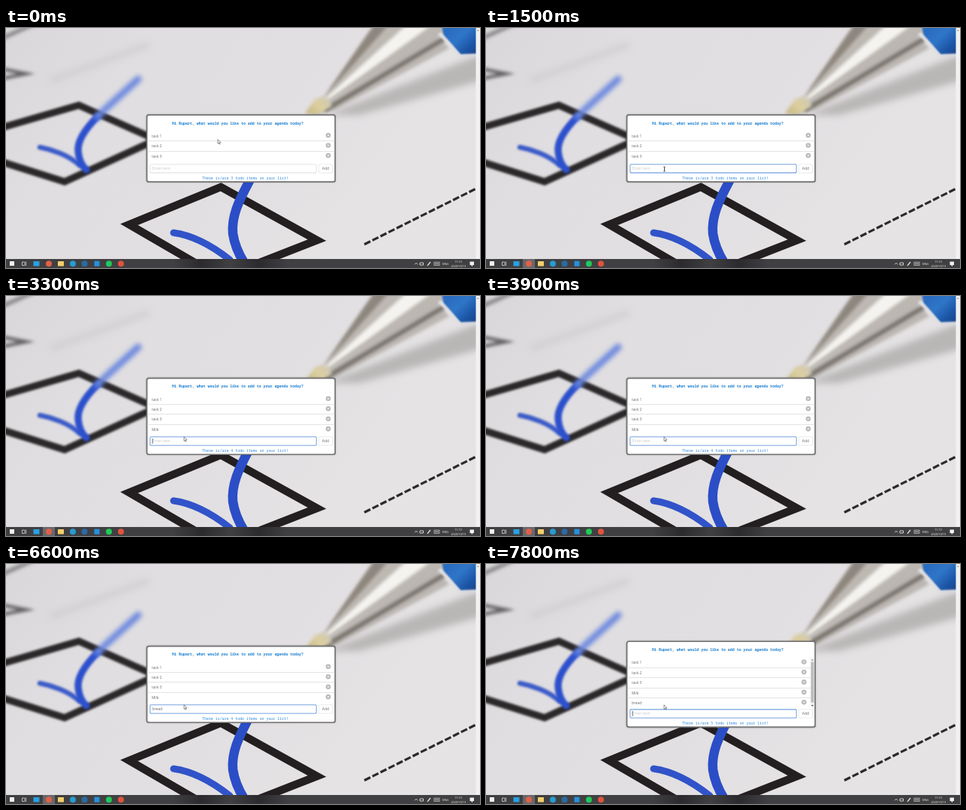
Animation of 631 by 320 pixels, one loop 8000 ms. Source, as an HTML page with a canvas:

```html
<!DOCTYPE html>
<html lang="en">
<head>
<meta charset="utf-8">
<title>Agenda list</title>
<style>
html, body { margin: 0; width: 100%; height: 100%; overflow: hidden; background: #dedcde; }
canvas { display: block; width: 631px; height: 320px; }
</style>
</head>
<body>
<canvas id="stage" width="631" height="320"></canvas>
<script>
const W = 631, H = 320, LOOP = 8000;
const SANS = '"Open Sans", "Noto Sans", sans-serif';
const MONO = '"Noto Sans Mono", "DejaVu Sans Mono", monospace';
const ctx = document.getElementById('stage').getContext('2d');
const TASKS = ['task 1', 'task 2', 'task 3', 'Milk', 'bread'];

// time, task count, typed text, start of caret blinking
const STEPS = [
  [0, 3, ''], [1000, 3, ''],
  [1700, 3, 'M'], [2100, 3, 'Mi'], [2400, 3, 'Mil'], [2600, 3, 'Milk'],
  [3300, 4, '', 3400],
  [5200, 4, 'b'], [5400, 4, 'br'], [5700, 4, 'bre'], [5900, 4, 'brea'], [6000, 4, 'bread', 6100],
  [6800, 5, '']
];

function poly(c, pts, fill) {
  c.beginPath();
  pts.forEach(([x, y]) => c.lineTo(x, y));
  c.closePath();
  c.fillStyle = fill;
  c.fill();
}

function line(c, pts, color, width, closed) {
  c.beginPath();
  pts.forEach(([x, y]) => c.lineTo(x, y));
  if (closed) c.closePath();
  c.strokeStyle = color;
  c.lineWidth = width;
  c.stroke();
}

function curve(c, path, color, width) {
  c.strokeStyle = color;
  c.lineWidth = width;
  c.stroke(new Path2D(path));
}

function box(c, x, y, w, h, fill, r = 0) {
  c.beginPath();
  c.roundRect(x, y, w, h, r);
  c.fillStyle = fill;
  c.fill();
}

function disc(c, x, y, r, fill) {
  c.beginPath();
  c.arc(x, y, r, 0, 7);
  c.fillStyle = fill;
  c.fill();
}

function text(c, s, x, y, font, color, align = 'left') {
  c.font = font;
  c.fillStyle = color;
  c.textAlign = align;
  c.textBaseline = 'alphabetic';
  c.fillText(s, x, y);
}

function ramp(c, x0, y0, x1, y1, colors) {
  const g = c.createLinearGradient(x0, y0, x1, y1);
  colors.forEach((col, i) => g.addColorStop(i / (colors.length - 1), col));
  return g;
}

function paintPaper(c) {
  c.fillStyle = ramp(c, 0, 0, 420, 320, ['#d9d7d9', '#e0dee0', '#e1dfe1', '#e5e3e4']);
  c.fillRect(0, 0, W, H);

  // distant marks
  c.filter = 'blur(4px)';
  line(c, [[60, 70], [190, 22]], '#d0ced0', 7);
  c.filter = 'blur(2.2px)';
  line(c, [[-6, 14], [36, -5]], '#8f8d8f', 6);
  line(c, [[-8, 54], [27, 61], [-8, 68]], '#656365', 4.5);

  // middle box and tick
  c.filter = 'blur(1.5px)';
  c.lineJoin = 'miter';
  line(c, [[-20, 137], [97, 103], [200, 149], [78, 205], [-20, 174]], '#2b2829', 9.5);
  c.lineCap = 'round';
  curve(c, 'M45 159 C62 162 84 170 98 183', '#3a5ac8', 6.5);
  curve(c, 'M122 118 C106 134 95 150 96 164 C97 176 100 183 107 189', '#2c50cc', 9.5);
  c.filter = 'blur(3px)';
  curve(c, 'M176 68 C158 85 140 100 122 118', '#6a87de', 9);

  // near box and tick
  c.filter = 'blur(0.5px)';
  c.lineCap = 'butt';
  line(c, [[286, 212], [164, 262], [286, 333], [414, 283]], '#231f20', 10.5, true);
  c.lineCap = 'round';
  curve(c, 'M223 273 C246 276 270 287 298 309', '#3153c9', 9);
  curve(c, 'M324 204 C309 232 300 252 302 274 C304 288 309 300 317 313', '#2b4dc6', 12.5);

  // dashed rule
  c.lineCap = 'butt';
  c.setLineDash([9, 3]);
  line(c, [[477, 288.5], [632, 211]], '#2b2a2c', 3.2);
  c.setLineDash([]);
}

function paintPen(c) {
  const tip = [[404, 114], [418, 100]];
  const facet = (a, b, fill) => poly(c, [...tip, a, b], fill);

  c.filter = 'blur(5px)';
  poly(c, [[425, 116], [640, 32], [640, 68], [470, 116]], '#b9b6b6');
  c.filter = 'blur(2px)';
  facet([491, -5], [600, -5], '#bdb8b2');
  facet([491, -5], [510, -5], '#8d867e');
  facet([534, -5], [568, -5], '#f4f3ef');
  poly(c, [[408, 116], [420, 104], [570, 4], [590, 27], [440, 108]], '#bbb6b1');
  line(c, [[424, 110], [584, 14]], '#77716c', 6);
  poly(c, [[398, 114], [412, 94], [428, 92], [434, 104], [414, 116]],
    ramp(c, 400, 115, 430, 90, ['#c4b584', '#dccf9f', '#cfc8b8']));
  c.filter = 'blur(1.3px)';
  poly(c, [[580, -5], [635, -5], [635, 36], [606, 37], [582, 9]],
    ramp(c, 592, 0, 628, 38, ['#2a6cc0', '#2f76c8', '#1c56a8', '#173f7e']));
  line(c, [[577, 7], [604, 37], [632, 36]], '#e0e0e2', 4);
  c.filter = 'none';
}

function paintTaskbar(c) {
  const base = '#404042', dark = '#2b2a2d';
  box(c, 0, 308, W, 12, ramp(c, 222, 0, 375, 0, [base, dark, base, dark, base]));
  box(c, 5, 311, 6, 6, '#f2f2f2');
  c.globalAlpha = 0.85;
  line(c, [[21.5, 312], [25, 312], [25, 316.5], [21.5, 316.5]], '#eee', 0.8, true);
  line(c, [[26.6, 311.5], [26.6, 317]], '#eee', 0.8);
  c.globalAlpha = 1;
  box(c, 36.5, 311, 8, 6.5, '#2aa0e4');
  box(c, 69, 311, 8, 6.5, '#f3cf6a', 0.6);
  [[89, '#2a9bd0'], [104.5, '#2c6aa4'], [137, '#1fca5c'], [153, '#e0523f']]
    .forEach(([x, col]) => disc(c, x, 314.2, 4, col));
  box(c, 117.5, 310.7, 7, 7, '#2790dc');

  line(c, [[544, 315.4], [546, 313.2], [548, 315.4]], '#eee', 0.8);
  line(c, [[551, 313], [555.5, 313], [555.5, 316], [551, 316]], '#ddd', 0.9, true);
  line(c, [[561, 316.8], [565, 312]], '#e6e6e6', 1.3);
  line(c, [[570, 312.2], [577, 312.2], [577, 316.4], [570, 316.4]], '#ddd', 0.7, true);
  line(c, [[571, 314.3], [576, 314.3]], '#ccc', 1);
  text(c, 'ENG', 585, 315.8, '4px ' + SANS, '#f4f4f4', 'center');
  text(c, '11:15', 602, 312.7, '3.8px ' + SANS, '#f4f4f4', 'center');
  text(c, '2020/10/19', 602.3, 318.9, '3.7px ' + SANS, '#f4f4f4', 'center');
  box(c, 617.5, 311.5, 5.5, 4.5, '#f0f0f0');
  poly(c, [[619, 316], [621.5, 316], [620.6, 317.8]], '#f0f0f0');
}

function makeBackdrop() {
  const cv = document.createElement('canvas');
  cv.width = W;
  cv.height = H;
  const c = cv.getContext('2d');
  paintPaper(c);
  paintPen(c);
  box(c, 625.5, 0, 5.5, 308, '#f1f1f1');
  poly(c, [[627, 4], [628.3, 2.3], [629.6, 4]], '#8a8a8a');
  paintTaskbar(c);
  return cv;
}

function drawRemove(x, y) {
  disc(ctx, x, y, 3.3, '#b9b9b9');
  line(ctx, [[x - 1.2, y - 1.2], [x + 1.2, y + 1.2]], '#fff', 0.8);
  line(ctx, [[x + 1.2, y - 1.2], [x - 1.2, y + 1.2]], '#fff', 0.8);
}

function drawScroll(top) {
  box(ctx, 432, top, 5, 65.5, '#f1f1f1');
  box(ctx, 432.5, top + 5, 4, 54, '#bdbdbd');
  poly(ctx, [[433, top + 3], [434.5, top + 1.4], [436, top + 3]], '#777');
  poly(ctx, [[433, top + 62.5], [434.5, top + 64.1], [436, top + 62.5]], '#444');
}

function drawInput(y, typed, focus, caret) {
  const font = '4.9px ' + SANS;
  box(ctx, 191.5, y - 6, 222, 12, '#dcdcdc', 1.5);
  if (focus > 0) {
    ctx.globalAlpha = focus;
    box(ctx, 191, y - 6.5, 223, 13, '#dfeafa', 2);
    box(ctx, 191.5, y - 6, 222, 12, '#5c93dc', 1.5);
    ctx.globalAlpha = 1;
  }
  box(ctx, 192.3, y - 5.2, 220.4, 10.4, '#fff', 1);
  text(ctx, typed || 'Enter item', 194.8, y + 1.8, font, typed ? '#666' : '#c6c6c6');
  if (caret) {
    const x = typed ? 195 + ctx.measureText(typed).width : 194.7;
    box(ctx, x, y - 3.6, 0.7, 7, '#333');
  }
  box(ctx, 416, y - 6, 19, 12, '#e4e4e4', 1.5);
  box(ctx, 416.7, y - 5.3, 17.6, 10.6, '#fff', 1);
  text(ctx, 'Add', 425.4, y + 1.8, font, '#666', 'center');
}

function drawPanel(n, typed, focus, caret) {
  const extra = n - 3, top = 115 - 6.3 * extra, h = 91 + 12.4 * extra;
  ctx.shadowColor = 'rgba(0,0,0,.3)';
  ctx.shadowBlur = 2;
  box(ctx, 186.7, top, 252.3, h, '#727273', 3.5);
  ctx.shadowBlur = 0;
  ctx.shadowColor = 'transparent';
  box(ctx, 188.4, top + 1.7, 248.9, h - 3.4, '#fff', 2);
  text(ctx, 'Hi Rupert, what would you like to add to your agenda today?', 308.5, top + 13.6,
    'bold 4.95px ' + MONO, '#1a7fd0', 'center');

  const full = n > 4;
  for (let i = 0; i < n; i++) {
    const y = top + 28.9 + 13.45 * i;
    text(ctx, TASKS[i], 193.9, y + 1.9, '4.9px ' + SANS, '#6a6a6a');
    drawRemove(full ? 423.3 : 429, y - 0.8);
    if (i < n - 1) box(ctx, 188.5, Math.round(y + 6.3), full ? 243.5 : 248.7, 1, '#e4e4e4');
  }
  if (full) drawScroll(top + 23.2);
  drawInput(top + h - 18.6, typed, focus, caret);
  text(ctx, `There is/are ${n} todo items on your list!`, 318.5, top + h - 4.4,
    '4.93px ' + MONO, '#2e88d8', 'center');
}

function pointer(t) {
  if (t < 300) {
    const k = 1 - (1 - t / 300) ** 2;
    return [282 + 18 * k, 148.6 - 4.6 * k];
  }
  const u = Math.min(1, (t - 300) / 400), k = u * u * (3 - 2 * u);
  return [300 - 63 * k, 144 + 43.8 * k];
}

function drawPointer(x, y, beam) {
  if (beam) {
    line(ctx, [[x + 0.5, y - 2.5], [x + 0.5, y + 3]], '#333', 0.9);
    line(ctx, [[x - 1, y - 2.7], [x + 2, y - 2.7]], '#444', 0.7);
    line(ctx, [[x - 1, y + 3.2], [x + 2, y + 3.2]], '#444', 0.7);
    return;
  }
  const shape = [[0, 0], [0, 5.6], [1.2, 4.5], [2.1, 6.4], [3, 6], [2.2, 4.1], [3.9, 4]]
    .map(([a, b]) => [x + a, y + b]);
  poly(ctx, shape, '#fff');
  line(ctx, shape, '#444', 0.6, true);
}

const backdrop = makeBackdrop();

function render(ms) {
  const t = Math.floor((ms % LOOP) / 100) * 100;
  const [at, n, typed, blink = at] = STEPS.filter(s => s[0] <= t).pop();
  const focus = t < 900 ? 0 : t < 1000 ? 0.5 : 1;
  const caret = t >= 1000 && Math.floor(Math.max(0, t - blink) / 500) % 2 === 0;

  ctx.drawImage(backdrop, 0, 0);
  if (focus) box(ctx, 49, 308, 16, 12, '#6a686a');
  disc(ctx, 57, 314.2, 4, '#e2604a');
  drawPanel(n, typed, focus, caret);
  const [x, y] = pointer(t);
  drawPointer(x, y, n === 3 && y > 181);
}

let start;
function tick(now) {
  start ??= now;
  render(now - start);
  requestAnimationFrame(tick);
}
render(0);
requestAnimationFrame(tick);
</script>
</body>
</html>
```
